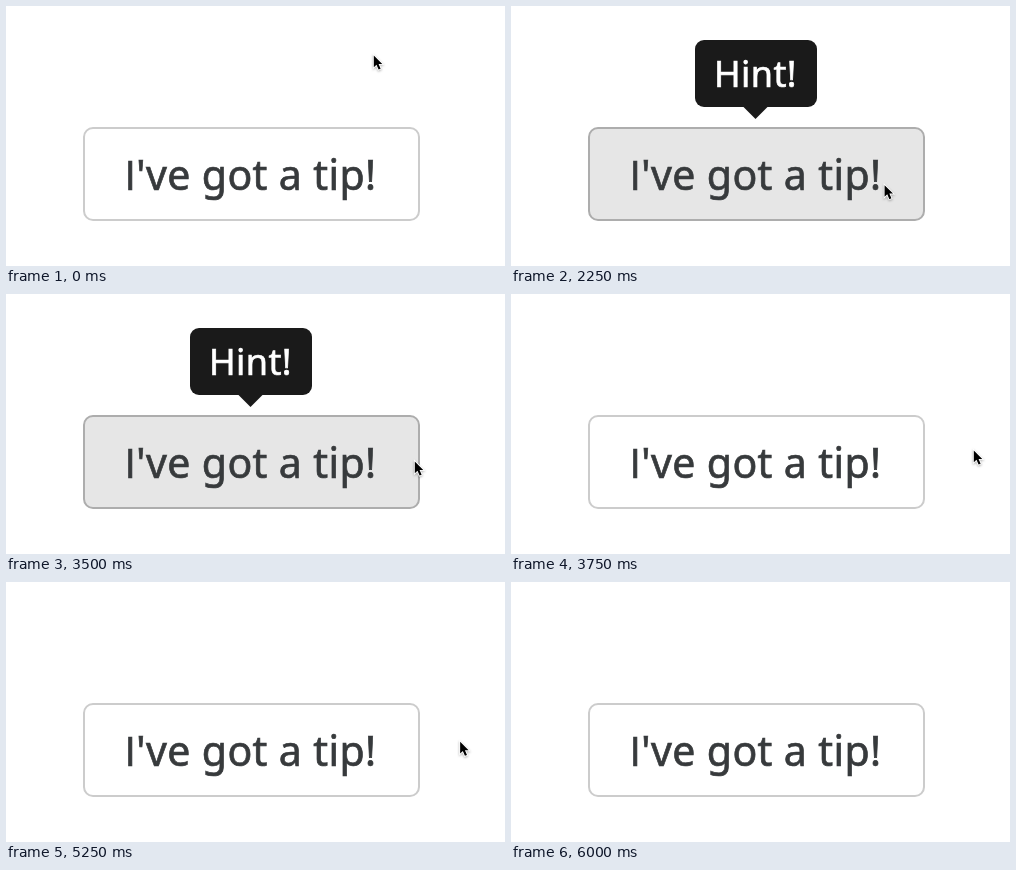
These frames come from a looping animation (499 px wide and 260 px high, 7 s). An HTML page:

```html
<!DOCTYPE html>
<html lang="en">
<head>
<meta charset="utf-8">
<title>Tooltip on hover</title>
<style>
  html, body { margin: 0; width: 100%; height: 100%; overflow: hidden; background: #fff; }
  svg { display: block; width: 499px; height: 260px; }
  text { font-family: "Noto Sans", sans-serif; letter-spacing: .4px; stroke-width: .7; }
  .plain { font-family: "Open Sans", sans-serif; }
  #label { fill: #373a3c; stroke: #373a3c; font-size: 41px; }
  #button { fill: #fff; stroke: #ccc; stroke-width: 2; }
  .hover #button { fill: #e6e6e6; stroke: #adadad; }
  #tip { visibility: hidden; fill: #1a1a1a; }
  #tip text { fill: #fff; stroke: #fff; font-size: 36px; }
  .hover #tip { visibility: visible; }
  #cursor { filter: drop-shadow(0 1px 1px rgba(0, 0, 0, .3)); }
</style>
</head>
<body>
<svg id="stage" viewBox="0 0 499 260">
  <rect id="button" x="78" y="122" width="335" height="92" rx="9"/>
  <text id="label" x="118.5" y="183.5"><tspan class="plain">I</tspan>'ve got a tip!</text>
  <g id="tip">
    <rect x="184" y="34" width="122" height="67" rx="9"/>
    <path d="M232 100.5H257L244.5 113Z"/>
    <text x="203" y="81">Hint!</text>
  </g>
  <g id="cursor">
    <path transform="translate(.8 .5) scale(.9)" d="M0 0V13L3 10.2L5.3 15.6L7.6 14.6L5.3 9.4H9.4Z" fill="#000" stroke="#fff" stroke-width="2" paint-order="stroke"/>
  </g>
</svg>
<script>
  const STEP = 250, LOOP = 7000;
  const HOVER_FROM = 6, EXIT = 24;

  // Turning points of the pointer, with the time in steps.
  const turns = [
    { t: 0.5, x: 367, y: 49 },
    { t: 2.5, x: 322, y: 168 },
    { t: 4, x: 322, y: 152.5 },
    { t: 6, x: 320, y: 151 },
    { t: 7.3, x: 268, y: 208 },
    { t: 10.4, x: 450, y: 157 },
    { t: 13, x: 354, y: 178 },
    { t: 15, x: 462, y: 156 },
    { t: 17.8, x: 350, y: 194 },
    { t: 20.8, x: 456, y: 158 },
    { t: 22.7, x: 358, y: 206 }
  ];

  const stage = document.getElementById("stage");
  const cursor = document.getElementById("cursor");
  const ease = u => (1 - Math.cos(Math.PI * u)) / 2;
  const overButton = ({ x, y }) => x >= 77 && x < 414 && y >= 121 && y < 215;

  function pointerAt(t) {
    const next = turns.findIndex(turn => turn.t > t);
    if (next === 0) return turns[0];
    if (next < 0) return turns[turns.length - 1];
    const a = turns[next - 1], b = turns[next];
    const k = ease((t - a.t) / (b.t - a.t));
    return { x: a.x + (b.x - a.x) * k, y: a.y + (b.y - a.y) * k };
  }

  function draw(now) {
    const step = Math.floor((now % LOOP) / STEP);
    const point = pointerAt(step);
    const inside = step < EXIT;
    // The hover state reacts only once the pointer has settled on the button.
    const hover = inside && step >= HOVER_FROM && overButton(point);
    stage.classList.toggle("hover", hover);
    cursor.style.visibility = inside ? "visible" : "hidden";
    cursor.setAttribute("transform", `translate(${point.x} ${point.y})`);
  }

  const start = performance.now();
  function tick() {
    draw(performance.now() - start);
    requestAnimationFrame(tick);
  }
  tick();
</script>
</body>
</html>
```
